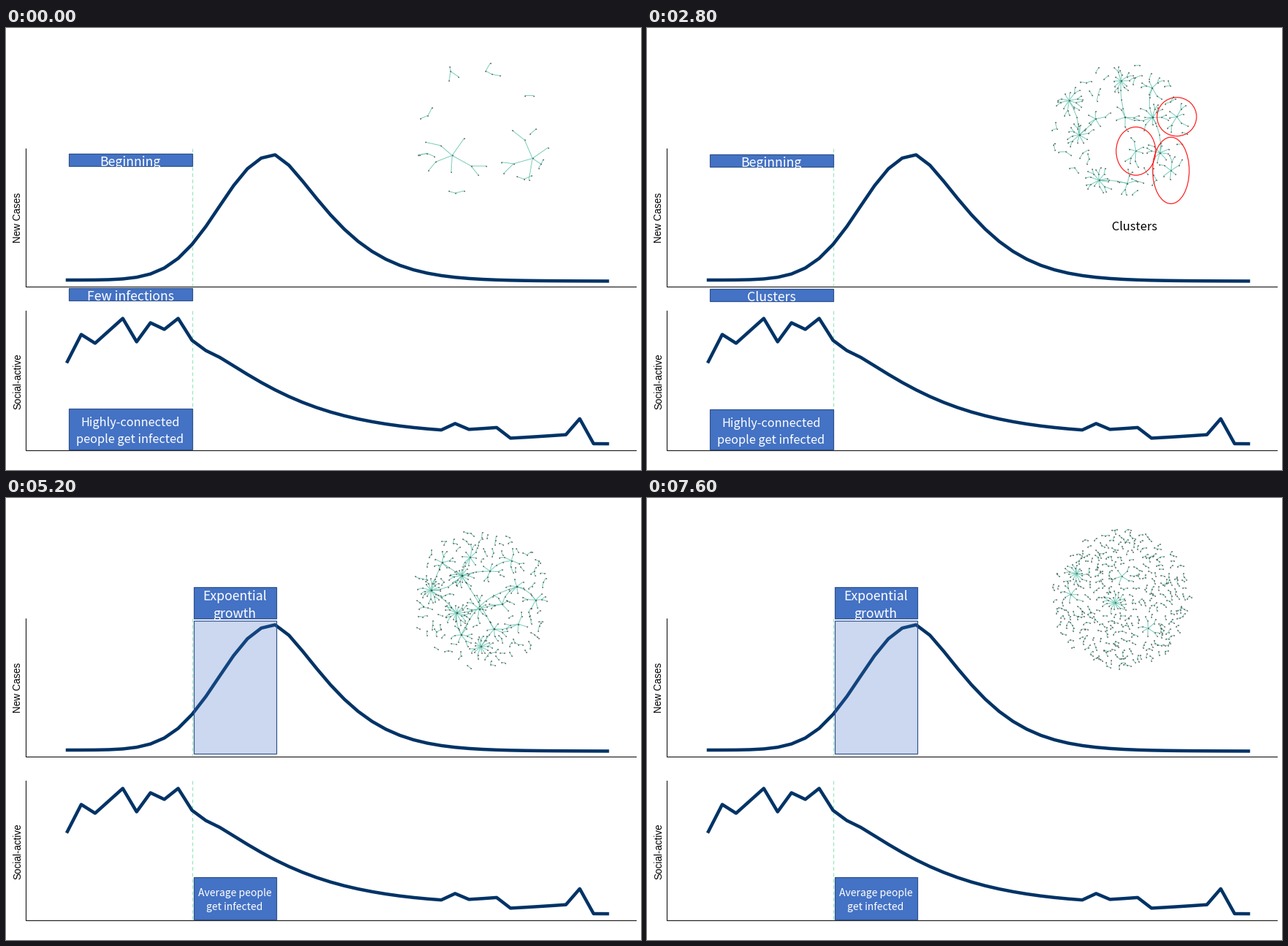
A matplotlib script that plays this animation: 869 px wide and 605 px high, repeating every 8 s.

```python
import math

import matplotlib.pyplot as plt
import numpy as np
from matplotlib.animation import FuncAnimation
from matplotlib.collections import LineCollection
from matplotlib.patches import Ellipse, Rectangle

W, H, STEP = 869, 605, 400
CX, CY, R = 650, 138, 95.5
NAVY, BLUE, RIM = "#003366", "#4472C4", "#2F528F"
TEAL, GREEN = "#66c5b0", "#97e6be"
SANS = "Noto Sans CJK JP"
GOLDEN = math.pi * (3 - math.sqrt(5))

STARTS = [0, 400, 800, 1200, 1600, 2800, 4000, 4400, 5200, 6000, 7200, 7600]
RINGS = [(725.5, 121, 54, 53), (669.5, 168, 54, 66), (717.5, 194.5, 50, 91)]
RING_STAGE = 5

# Largest hubs of some stages; all other nodes follow from the growth rule.
LEADS = {0: [(611, 174), (721, 178)],
         2: [(592, 144), (634, 199), (711, 152), (667, 64)],
         5: [(619, 208), (578, 99), (649, 72), (592, 146)],
         6: [(672, 126), (571, 126), (613, 196), (614, 104)],
         8: [(582, 126), (650, 203), (617, 157), (624, 106)],
         9: [(647, 114), (662, 136), (655, 152), (609, 183)],
         11: [(641, 143), (588, 103)]}


class Net:
    """Contact network inside a disc: nodes and straight edges."""

    def __init__(self, seed):
        self.rng = np.random.default_rng(seed)
        self.nodes, self.edges = [], []

    def add(self, x, y):
        d = math.hypot(x - CX, y - CY)
        s = R / max(d, R)
        p = (CX + (x - CX) * s, CY + (y - CY) * s)
        self.nodes.append(p)
        return p

    def grow(self, p, angle, length):
        q = self.add(p[0] + length * math.cos(angle), p[1] + length * math.sin(angle))
        self.edges.append((p, q))
        return q

    def clear(self, p, gap):
        return all(math.dist(p, q) > gap for q in self.nodes)

    def star(self, p, spokes, reach, bud=.5):
        p, turn = self.add(*p), self.rng.uniform(0, 2 * math.pi)
        for i in range(spokes):
            a = turn + (i + self.rng.uniform(-.25, .25)) * 2 * math.pi / spokes
            q = self.grow(p, a, reach * self.rng.uniform(.7, 1.1))
            if self.rng.random() < bud:
                for side in (-.5, .4)[:self.rng.integers(1, 3)]:
                    self.grow(q, a + side, reach * self.rng.uniform(.5, .75))

    def chain(self, a, b, step):
        t = np.linspace(0, 1, max(2, round(math.dist(a, b) / step) + 1))
        bow = self.rng.uniform(-.15, .15) * np.sin(np.pi * t)
        dx, dy = b[0] - a[0], b[1] - a[1]
        pts = list(zip(a[0] + dx * t - dy * bow, a[1] + dy * t + dx * bow))
        self.nodes += pts
        self.edges += zip(pts, pts[1:])

    def scatter(self, n, step, gap, inner):
        for p in spiral(n, R - 2, inner):
            if not self.clear(p, gap):
                continue
            p, turn = self.add(*p), self.rng.uniform(0, 2 * math.pi)
            for _ in range(self.rng.choice([1, 1, 2, 2, 3])):
                q = self.grow(p, turn, step * self.rng.uniform(.8, 1.1))
                turn += self.rng.uniform(-.9, .9)
                if self.rng.random() < .7:
                    p = q
                else:
                    turn += 2


def spiral(n, radius, inner=0.0, turn=0.0):
    """Evenly spread points of a disc whose middle may be empty."""
    for i in range(n):
        d = radius * math.sqrt(inner ** 2 + (1 - inner ** 2) * (i + .5) / n)
        a = i * GOLDEN + turn
        yield CX + d * math.cos(a), CY + d * math.sin(a)


def build(stage):
    net = Net(stage)
    last = len(STARTS) - 1
    age = stage / last
    reach = 9 + 20 / (1 + stage)
    if stage == RING_STAGE:
        for x, y, *_ in RINGS:
            net.star((x, y), 6, 13)

    hubs = list(LEADS.get(stage, []))
    for p in hubs:
        net.star(p, min(5 + stage, 14), reach)
    peak = min(stage, 3 * (last + .5 - stage))
    for p in spiral(round(2 * peak), .8 * R, turn=stage):
        if net.clear(p, .8 * reach):
            net.star(p, net.rng.integers(4, 9), reach)
            hubs.append(p)

    if stage < last:
        for i in range(1, len(hubs)):
            near = min(hubs[:i], key=lambda h: math.dist(h, hubs[i]))
            if math.dist(near, hubs[i]) < 70:
                net.chain(near, hubs[i], reach)
        for _ in range(max(0, stage - 5)):
            i, j = net.rng.choice(len(hubs), 2, replace=False)
            net.chain(hubs[i], hubs[j], reach)

    loose = round(10 + 320 * age ** 1.8)
    space = 168 / math.sqrt(loose)
    net.scatter(loose, min(.5 * space, 12), min(.55 * space, 16), .8 * (1 - age ** 2))
    return net


def cases(i):
    d = i - 15
    bell = np.exp(-(np.abs(d) / 5.4) ** np.where(d < 0, 2.15, 1.45))
    return 344.5 + 1.5 * i / 39 - 172 * bell


def active(i):
    trend = 556 - 116 * np.exp(-(np.maximum(i - 10, 0) / 7.23) ** 1.25)
    kinks = [(0, 16), (1, -21), (2, -9), (4, -43), (5, -11), (6, -37), (7, -28),
             (8, -43), (9, -13), (10, 1), (22, 0), (27, 0), (28, -10), (29, -3),
             (31, -7), (32, 7), (36, 1), (37, -21), (38, 13)]
    return trend + np.interp(i, *zip(*kinks))


fig = plt.figure(figsize=(869.01 / 72, 605.01 / 72), dpi=72, facecolor="white")
ax = fig.add_axes([0, 0, 1, 1])
ax.set(xlim=(.5, W + .5), ylim=(H - .5, -.5))
ax.axis("off")


def panel(label, mid, top, base, curve):
    week = np.arange(40)
    ax.plot([27, 27, 862], [top, base, base], color="#222222", lw=1.2)
    ax.plot([255, 255], [top, base - 1], color=GREEN, lw=1.2, dashes=(4, 3))
    ax.plot(84.5 + 18.95 * week, curve(week), color=NAVY, lw=4.5,
            solid_joinstyle="round", solid_capstyle="projecting")
    ax.text(23.5, mid, label, rotation=90, size=13.5, family="Liberation Sans",
            ha="right", va="center")


def box(x0, y0, x1, y1, size=0, lines=(), fill=BLUE):
    r = ax.add_patch(Rectangle((x0, y0), x1 - x0, y1 - y0, fc=fill, ec=RIM,
                               lw=1.2, zorder=5))
    parts = [r]
    for s, y in lines:
        t = ax.text((x0 + x1) / 2, y, s, size=size, family=SANS, color="white",
                    ha="center", va="baseline", zorder=6)
        t.set_clip_path(r)
        parts.append(t)
    return parts


def opening(state, dy):
    return (box(86, 172 + dy, 255, 189 + dy, 17.7, [("Beginning", 188 + dy)])
            + box(86, 356 + dy, 255, 373 + dy, 17.7, [(state, 372 + dy)])
            + box(86, 521 + dy, 255, 577, 16.3,
                  [("Highly-connected", 544 + dy), ("people get infected", 567 + dy)]))


panel("New Cases", 259.5, 165, 354, cases)
panel("Social-active", 483, 387, 578, active)

start = opening("Few infections", 0)
clusters = opening("Clusters", 1)
for x, y, w, h in RINGS:
    clusters.append(ax.add_patch(Ellipse((x, y), w, h, fc="none", ec="#ff1a1a",
                                         lw=1.2, zorder=5)))
clusters.append(ax.text(667.5, 276, "Clusters", size=16.4, family=SANS,
                        ha="center", va="baseline"))
growth = (box(257, 122, 370, 165, 17.7, [("Expoential", 139), ("growth", 163)])
          + box(257, 168, 370, 350, fill=BLUE + "45")
          + box(257, 519, 370, 577, 13.9, [("Average people", 544), ("get infected", 563)]))
phases = [start, clusters, growth]

nets = [build(stage) for stage in range(len(STARTS))]
links = ax.add_collection(LineCollection([], colors=TEAL, linewidths=.85))
dots, = ax.plot([], [], "s", ms=1.5, color="#45433f", mew=0, zorder=4)


def draw(i):
    stage = sum(s <= i * STEP for s in STARTS) - 1
    links.set_segments(nets[stage].edges)
    dots.set_data(*zip(*nets[stage].nodes))
    phase = (stage >= RING_STAGE) + (stage > RING_STAGE)
    for k, parts in enumerate(phases):
        for part in parts:
            part.set_visible(k == phase)
    return [links, dots]


anim = FuncAnimation(fig, draw, frames=20, interval=STEP, init_func=lambda: draw(0),
                     repeat=True, repeat_delay=0, blit=False)
plt.show()
```
